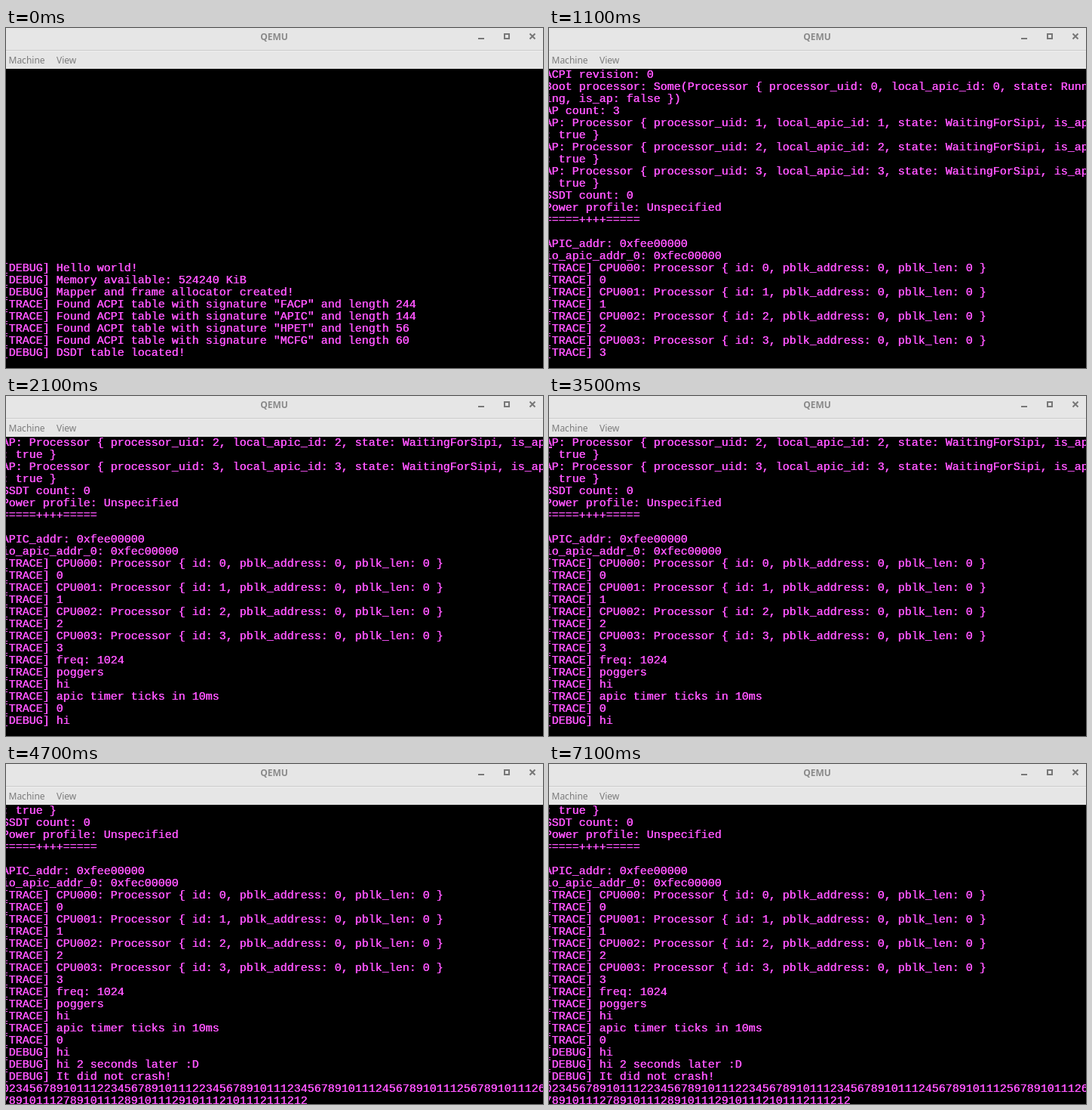
Recreate the animation shown at these times as an HTML page with a canvas. Size 712x450 px, loop 7200 ms.

```html
<!DOCTYPE html>
<html lang="en">
<head>
<meta charset="utf-8">
<title>QEMU</title>
<style>
  html, body { margin: 0; height: 100%; overflow: hidden; background: #000; }
  canvas { display: block; }
</style>
</head>
<body>
<canvas id="stage" width="712" height="450"></canvas>
<script>
const ctx = document.getElementById('stage').getContext('2d');
const LOOP = 7200, COLS = 80, ROWS = 25;
const CELL_W = 9, CELL_H = 16, LEFT = -5, TOP = 54;
const PINK = '#ff55ff';

const range = (from, to) => Array.from({ length: to - from + 1 }, (_, i) => from + i);
const processor = (id, state, ap) =>
  `Processor { processor_uid: ${id}, local_apic_id: ${id}, state: ${state}, is_ap: ${ap} }`;
const table = ([name, size]) =>
  `[TRACE] Found ACPI table with signature "${name}" and length ${size}`;

const output = [
  '[DEBUG] Hello world!',
  '[DEBUG] Memory available: 524240 KiB',
  '[DEBUG] Mapper and frame allocator created!',
  ...[['FACP', 244], ['APIC', 144], ['HPET', 56], ['MCFG', 60]].map(table),
  '[DEBUG] DSDT table located!',
  '[DEBUG] DSDT table parsed',
  '[DEBUG] Found ACPI data!',
  '=====ACPI=====',
  'ACPI revision: 0',
  `Boot processor: Some(${processor(0, 'Running', false)})`,
  'AP count: 3',
  ...[1, 2, 3].map(id => 'AP: ' + processor(id, 'WaitingForSipi', true)),
  'SSDT count: 0',
  'Power profile: Unspecified',
  '=====++++=====',
  '',
  'APIC_addr: 0xfee00000',
  'io_apic_addr_0: 0xfec00000',
  ...range(0, 3).flatMap(id => [
    `[TRACE] CPU00${id}: Processor { id: ${id}, pblk_address: 0, pblk_len: 0 }`,
    `[TRACE] ${id}`,
  ]),
  '[TRACE] freq: 1024',
  '[TRACE] poggers',
  '[TRACE] hi',
  '[TRACE] apic timer ticks in 10ms',
  '[TRACE] 0',
  '[DEBUG] hi',
  '[DEBUG] hi 2 seconds later :D',
  '[DEBUG] It did not crash!',
  '0' + [2, 2, ...range(2, 12)].flatMap(n => range(n, 12)).join(''),
];

// Wrap at the terminal width
const lines = output.flatMap(s => s.match(new RegExp(`.{1,${COLS}}`, 'g')) || ['']);

// [time, lines printed, cells already moved up by the next scroll]
const printed = [
  [0, 8], [400, 9], [500, 11], [600, 14], [700, 17], [800, 21], [900, 24, 12 * COLS + 42],
  [1000, 30], [1100, 35], [1900, 39], [2000, 41], [4400, 42], [4600, 45],
];

// Cursor toggles, in tenths of a second, starting hidden
const blinks = [12, 14, 17, 19, 22, 24, 26, 28, 30, 33, 35, 37, 40, 42,
  44, 46, 48, 50, 51, 53, 56, 58, 60, 63, 64, 66, 68, 70];

function screenAt(t) {
  const [, count, moved = 0] = printed.findLast(([start]) => t >= start);
  // The last line has no newline, so it reaches the bottom row
  const bottom = count === lines.length ? ROWS : ROWS - 1;
  const line = r => (r < bottom && lines[count - bottom + r] || '').padEnd(COLS);
  return range(0, ROWS - 1).map(r => {
    const split = Math.min(Math.max(moved - r * COLS, 0), COLS);
    return line(r + 1).slice(0, split) + line(r).slice(split);
  });
}

function drawTerminal(t) {
  ctx.fillStyle = '#000';
  ctx.fillRect(0, TOP, 712, 396);
  ctx.fillStyle = PINK;
  ctx.font = '15px "Liberation Mono", monospace';
  screenAt(t).forEach((text, r) => {
    // Doubled strokes: thick verticals, thin horizontals
    for (const dx of [-0.5, 0]) ctx.fillText(text, LEFT + dx, TOP + r * CELL_H + 12);
  });
  if (blinks.filter(b => t >= b * 100).length % 2) {
    ctx.fillRect(LEFT, TOP + 13, CELL_W, 2);
  }
}

function drawWindow() {
  ctx.fillStyle = '#e6e6e6';
  ctx.fillRect(0, 0, 712, TOP);
  ctx.fillStyle = '#cacaca';
  ctx.fillRect(0, 29, 712, 1);
  ctx.fillStyle = '#eeeeee';
  ctx.fillRect(0, 30, 712, 1);

  ctx.fillStyle = '#8a8a8a';
  ctx.font = 'bold 12px "Noto Sans", sans-serif';
  ctx.textAlign = 'center';
  ctx.fillText('QEMU', 355.5, 16);
  ctx.textAlign = 'left';
  ctx.fillStyle = '#7c7c7c';
  ctx.font = '12px "Noto Sans", sans-serif';
  ctx.fillText('Machine', 3.5, 47);
  ctx.fillText('View', 67, 47);

  ctx.strokeStyle = ctx.fillStyle = '#777';
  ctx.lineWidth = 2;
  ctx.fillRect(626, 13, 8, 2);
  ctx.strokeRect(661, 8, 6, 6);
  ctx.stroke(new Path2D('M694.5 7.5l7 7m0-7l-7 7'));
}

function frame(now) {
  drawTerminal(now % LOOP);
  drawWindow();
  requestAnimationFrame(frame);
}
requestAnimationFrame(frame);
</script>
</body>
</html>
```
